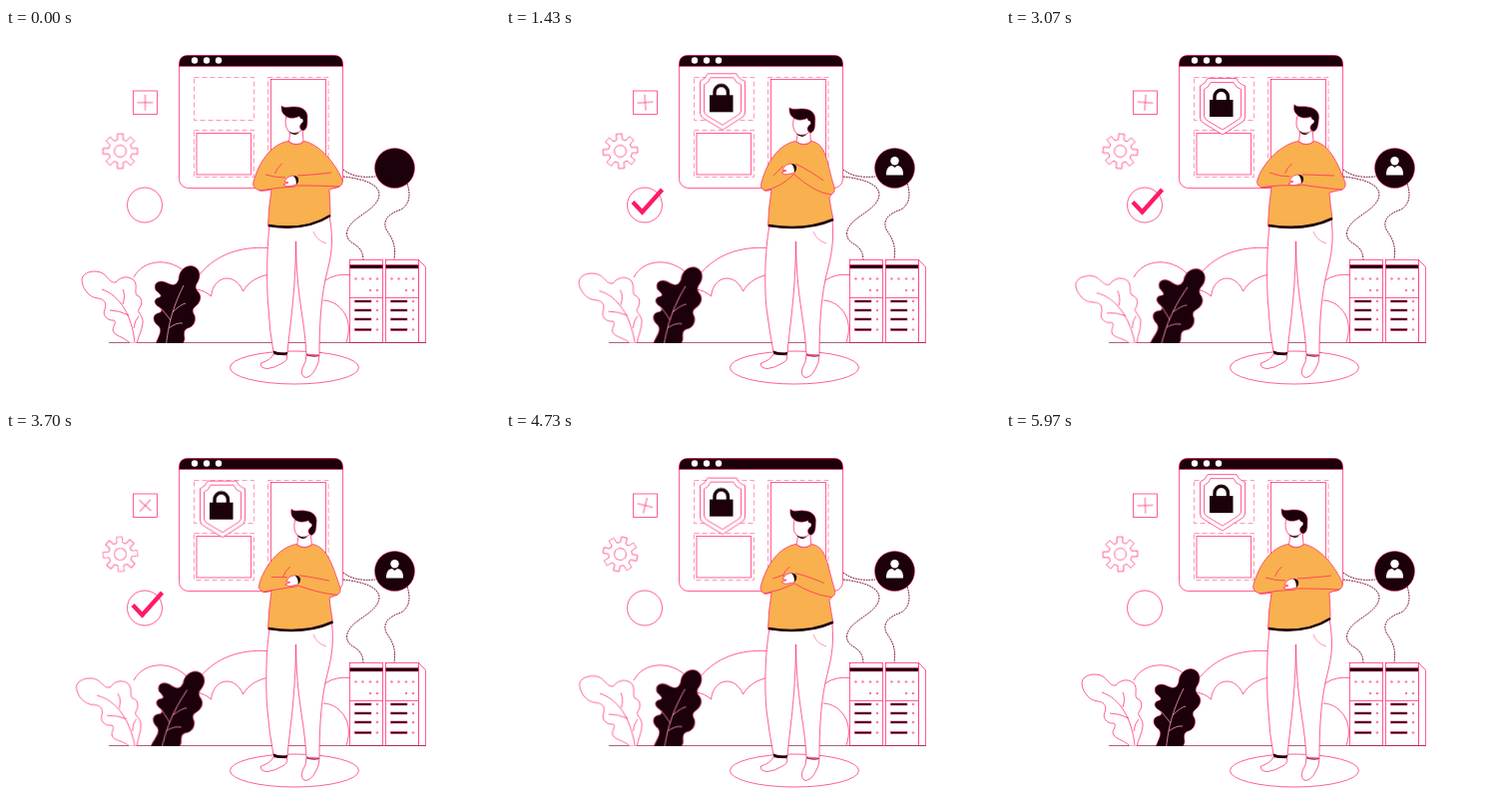
Recreate the animation shown at these times as an HTML page. Size 495 by 376 pixels, loop 6 s.

```html
<!DOCTYPE html>
<html lang="en">
<head>
<meta charset="utf-8">
<title>Server security</title>
<style>
html, body { margin: 0; width: 100%; height: 100%; overflow: hidden; background: #fff; }
svg { display: block; width: 495px; height: 376px; }
.line { fill: none; stroke: #ff1a66; stroke-width: .7; }
.paper { fill: #fff; stroke: #ff1a66; stroke-width: .7; }
.dark { fill: #1c000b; stroke: #ff1a66; stroke-width: .5; }
.ink { fill: #1c000b; }
.white { fill: #fff; }
.faint { stroke: #ff6c9c; }
.dash { stroke-dasharray: 5 3; }
.wire { fill: none; stroke: #7a0c35; stroke-width: 1; stroke-dasharray: 1.8 .9; }
.vein { fill: none; stroke: #ff9dbd; stroke-width: .8; }

.spin { animation: spin 6s linear infinite; }
.leaf { animation: sway 3s ease-in-out infinite alternate; }
#pale { --tilt: -6deg; transform-origin: 128px 315px; }
#shade { --tilt: 8.5deg; transform-origin: 168px 286px; }
.pop { animation: pop 6s infinite; }
#shield { transform-origin: 217px 72px; }
#user { transform-origin: 389.5px 140px; }
#bob { animation: bob 3s ease-in-out -5.75s infinite alternate; }
#tick { stroke-dasharray: 44 50; animation: tick 6s infinite; }

@keyframes spin { to { transform: rotate(360deg); } }
@keyframes sway { to { transform: rotate(var(--tilt)); } }
@keyframes bob { from { transform: translateY(-1px); } to { transform: translateY(6px); } }
@keyframes pop {
  0%, 2% { transform: scale(0); animation-timing-function: ease-out; }
  13%, 100% { transform: scale(1); }
}
@keyframes tick {
  0%, 10% { stroke-dashoffset: 45; animation-timing-function: ease-in-out; }
  21%, 68% { stroke-dashoffset: 0; animation-timing-function: ease-in-out; }
  80%, 100% { stroke-dashoffset: -45; }
}
</style>
</head>
<body>
<svg viewBox="0 0 495 376">
  <clipPath id="above"><rect width="495" height="315.5"/></clipPath>

  <!-- browser window -->
  <rect class="paper" x="173.5" y="27.5" width="164" height="133" rx="9"/>
  <path class="dark" d="M173.5 38.5V36Q173.5 27.5 182 27.5H329Q337.5 27.5 337.5 36V38.5Z"/>
  <g class="white">
    <circle cx="189" cy="32.5" r="3.2"/><circle cx="201" cy="32.5" r="3.2"/><circle cx="213" cy="32.5" r="3.2"/>
  </g>
  <g class="line dash faint">
    <rect x="188.5" y="49.5" width="60" height="43"/>
    <rect x="188.5" y="102.5" width="60" height="47"/>
    <rect x="262.5" y="49.5" width="60.5" height="100"/>
  </g>
  <rect class="line" x="191" y="105.5" width="54.5" height="41.5"/>
  <rect class="line" x="265.5" y="51.5" width="55" height="96"/>

  <g class="pop" id="shield"><g id="bob">
    <path class="paper" d="M202 44.5H231Q233 50 239.5 52V84Q239 88 234 90L217 101L199 90Q194.500 88 194.500 84V52Q200 50 202 44.500Z"/>
    <path class="line" d="M205 48.500H228Q230 54 235.500 55.500V82Q235 85 231 87L217 96L202 87Q198.500 85 198.500 82V55.500Q203 54 205 48.500Z"/>
    <rect class="ink" x="204" y="66" width="23.5" height="17"/>
    <path d="M209 67V63A6.700 6.700 0 0 1 222.400 63V67" fill="none" stroke="#1c000b" stroke-width="3.400"/>
  </g></g>

  <!-- side icons -->
  <rect class="line" x="127.5" y="63" width="24" height="23.5"/>
  <g transform="translate(139.5 74.7)"><path class="line spin" d="M-8 0H8M0-8V8"/></g>
  <g transform="translate(114.5 123.5)"><g class="line spin"><path id="gear"/><circle r="6"/></g></g>
  <circle class="line" cx="139" cy="177.5" r="17.5"/>
  <path id="tick" d="M127 174.500L136.500 184.500L156.500 162" fill="none" stroke="#ff1a66" stroke-width="4.300"/>

  <!-- cables and user badge -->
  <path class="wire" d="M338 142C347 149 357 150 370 149"/>
  <path class="wire" d="M338 149C356 151 374 156 374 167C373 184 343 189 341.500 206C342 219 357 214 358 232"/>
  <path class="wire" d="M402 156C406 168 404 177 396 182C384 186 377 192 381 202C387 211 391 217 389 232"/>
  <circle class="dark" cx="389.5" cy="140.5" r="20"/>
  <g class="white pop" id="user">
    <circle cx="389.5" cy="133.3" r="4.2"/>
    <path d="M381 147.500V145Q382 138 387 138L389.500 140L392 138Q397 138 398 145V147.500Z"/>
  </g>

  <!-- bushes -->
  <g class="line">
    <path d="M128 250C138 231 165 230 181 246"/>
    <path d="M194 247C211 227 234 219 262 220.500"/>
    <path d="M190 262Q199 263 205.500 269C208 247 230 245 237.500 264C243 254 253 249 264 247"/>
    <path d="M320 253Q330 246 345 247.500"/>
    <path d="M318 273C336 274 349 293 341 315"/>
  </g>
  <g id="servers"></g>
  <path class="line" d="M103 315.500H421" style="stroke:#8a1c45"/>
  <ellipse class="paper" cx="289" cy="340.5" rx="64.5" ry="16.5"/>

  <g clip-path="url(#above)">
    <g class="leaf" id="pale">
      <path class="paper" d="M124 316C118 309 107 309 107 302C108 298 111 295 108 293C102 294 96 288 99 282C101 276 99 272 92 271C82 270 76 260 76 252C77 244 90 242 97 246C103 250 104 256 110 255C114 250 121 248 127 252C133 257 128 264 131 268C137 270 137 277 133 282C131 285 138 289 137 296C136 304 133 308 131 316Z"/>
      <path class="line" d="M129 315C126 288 114 268 96 262M123 288Q113 283 104 283M117 277Q120 268 117 262M128 301Q129 293 133 289"/>
    </g>
    <g class="leaf" id="shade">
      <path class="dark" d="M148 324C150 312 158 305 153 299C147 295 146 288 152 286C158 285 156 281 152 279C147 275 149 271 154 270C157 268 153 266 150 263C147 256 153 252 160 255C168 259 171 258 173 252C173 244 179 238 186 238.500C194 240 196 248 192 255C189 259 190 262 193 265C197 270 194 276 190 279C186 282 187 285 189 288C191 295 187 300 182 301C177 303 179 308 179 312L175 324Z"/>
      <path class="vein" d="M160 324C162 295 169 276 178 258M165 293Q158 284 155 281M167 285Q175 277 180 276M163 301Q171 295 177 296"/>
    </g>
  </g>

  <!-- man -->
  <path class="paper" d="M268 327L281.500 328Q283 333 277 336Q269 341 262 341.500Q254 341 255.500 336Q265 333 268 327Z"/>
  <path class="paper" d="M301 328H314Q314 336 310 342Q306 350 300 350.500Q295 349 297 341Q301 335 301 328Z"/>
  <path class="paper" id="pants"/>
  <path class="ink" d="M268 323.500Q274 326.500 282 325V327.500Q274 329 268 326.500Z"/>
  <path class="line" d="M301 327.500Q307 330 313.500 328.500" style="stroke:#8a1c45;stroke-width:1.200"/>
  <path class="line faint" id="seams"/>
  <path id="shirt" fill="#f9b04e" stroke="#ff1a66" stroke-width=".7"/>
  <path id="hem" fill="none" stroke="#1c000b" stroke-width="2.6"/>
  <path class="line" id="sleeves"/>
  <g id="hand">
    <path class="paper" d="M-7 1Q-4-5 1-5Q6-4 6 0Q6 5 1 5Q-5 7-8 4Q-5 3-3 2Z"/>
    <path class="ink" d="M2-5Q8-5 7 1L5 4Q5-2 2-5Z"/>
  </g>
  <path class="paper" id="neck"/>
  <g id="head">
    <path class="paper" d="M281 87Q279 95 281 100Q284 107 291 105Q297 104 299 97L298 87Z"/>
    <path class="ink" d="M283 103.500Q288 107 294 104.500Q289 110 283 103.500Z"/>
    <path class="dark" d="M276 78C280 81 284 78.500 290 79C298 79 303 84 302 91C302 97 302 101 298 103Q294 102 294.500 98L297 94L294 88.500C289 91 283 91 280 88C276 85 276 82 276 78Z"/>
    <circle class="white" cx="295.5" cy="93" r="2.2"/>
  </g>
</svg>
<script>
const LOOP = 6000;
const el = id => document.getElementById(id);
const draw = (id, d) => el(id).setAttribute('d', d);
const move = (id, value) => el(id).setAttribute('transform', value);

// gear with eight teeth
const rim = [];
for (let i = 0; i < 8; i++) {
  for (const [r, a] of [[11.8, -.24], [17.5, -.17], [17.5, .17], [11.8, .24]]) {
    const angle = i * Math.PI / 4 + a;
    rim.push(`${(r * Math.cos(angle)).toFixed(2)} ${(r * Math.sin(angle)).toFixed(2)}`);
  }
}
draw('gear', `M${rim.join('L')}Z`);

function server(x) {
  const light = (dx, y) => `<circle class="line" cx="${x + dx}" cy="${y}" r=".8"/>`;
  const slots = [274, 283, 292, 302.5].map(y =>
    `<rect class="dark" x="${x + 5}" y="${y - 1}" width="16.5" height="2"/>` + light(27.5, y));
  return `<rect class="paper" x="${x}" y="232.5" width="33" height="83"/>
    <rect class="dark" x="${x}" y="237.5" width="33" height="3.5"/>
    <path class="line" d="M${x} 270.5h33"/>` +
    [6, 13, 20.5, 27.5].map(dx => light(dx, 251.5)).join('') +
    light(20.5, 263) + light(27.5, 263) + slots.join('');
}
el('servers').innerHTML = server(344.5) + server(380.5) +
  '<path class="paper" d="M413.5 232.5L420.5 239.5V315.5H413.5Z"/>';

// left elbow, left cuff, right elbow, right cuff, hand, right hem, knee shift
const wide = [248, 154, 254, 163, 337, 152, 334, 159, 286, 153, 325, 188, 0];
const tucked = [256, 155, 259, 163, 329, 160, 326, 167, 284, 141, 328, 192, -2];
const turned = [252, 152, 256, 160, 340, 155, 337, 162, 291, 152, 327, 191, 0];
const lowered = tucked.slice();
lowered[9] = 147;

const bodyKeys = [[0, wide], [1480, tucked], [3000, turned], [4480, lowered], [LOOP, wide]];
// head shift and tilt
const headKeys = [[0, [0, 0, 0]], [1430, [7.5, 2, 1]], [2170, [7, 0, 2]], [3070, [10, 0, 6]],
  [4330, [6.5, 2, 1]], [5130, [9, 0, 4]], [LOOP, [0, 0, 0]]];

function pose(keys, t) {
  const i = keys.findIndex(k => k[0] > t);
  const [[t0, a], [t1, b]] = [keys[i - 1], keys[i]];
  const u = (1 - Math.cos(Math.PI * (t - t0) / (t1 - t0))) / 2;
  return a.map((v, n) => v + (b[n] - v) * u);
}

function drawMan(t) {
  const [lx, ly, lcx, lcy, rx, ry, rcx, rcy, hx, hy, bx, by, k] = pose(bodyKeys, t);
  const [dx, dy, tilt] = pose(headKeys, t);
  const left = 282.5 + dx, right = 299 + dx;

  draw('pants', `M264 198C${261 + k} 225 ${261 + k} 262 ${263 + k} 281Q264 304 268 325L282 326
    C284 300 290 270 290.5 214C291 270 299 290 301 327L314 328C314 303 315 277 320 252C326 228 329 216 ${bx - 1} ${by}Z`);
  draw('seams', 'M308 204Q311 213 321 216');
  draw('shirt', `M${left} 113.5Q${291 + dx} 120 ${right} 113.5
    C${right + 15} 117 ${rx - 8} 134 ${rx} ${ry}Q${rx + 1} ${rcy - 2} ${rcx} ${rcy}
    L324 ${rcy + 3}Q325 178 ${bx} ${by}Q300 204 262.5 198.5Q263 180 266 ${lcy - 1}
    Q${lcx + 3} ${lcy + 1} ${lcx} ${lcy}Q${lx - 2} ${lcy - 3} ${lx} ${ly}
    C${lx + 5} 136 ${left - 18} 117 ${left} 113.5Z`);
  draw('hem', `M263 198Q300 204 ${bx} ${by}`);
  draw('sleeves', `M${lx + 12} ${ly - 7}Q${lx + 22} ${hy - 3} ${hx - 6} ${hy - 3}
    M${lcx} ${lcy}Q${lcx + 16} ${lcy - 3} ${hx + 4} ${hy + 6}
    M${rx - 11} ${ry - 7}Q${rx - 22} ${(ry + hy) / 2 - 6} ${hx + 6} ${hy - 5}
    M${rcx} ${rcy}Q${rcx - 16} ${rcy - 1} ${hx + 4} ${hy + 5}
    M${left - 6} 136Q${left - 11} 140 ${left - 13} 146`);
  move('hand', `translate(${hx} ${hy})`);
  draw('neck', `M${285 + dx} ${102 + dy}L${283.5 + dx} 114Q${291 + dx} 119 ${298 + dx} 114L${297 + dx} ${100 + dy}Z`);
  move('head', `translate(${dx} ${dy}) rotate(${tilt} 290 104)`);
}

let start;
function tick(now) {
  start ??= now;
  drawMan((now - start) % LOOP);
  requestAnimationFrame(tick);
}
drawMan(0);
requestAnimationFrame(tick);
</script>
</body>
</html>
```
